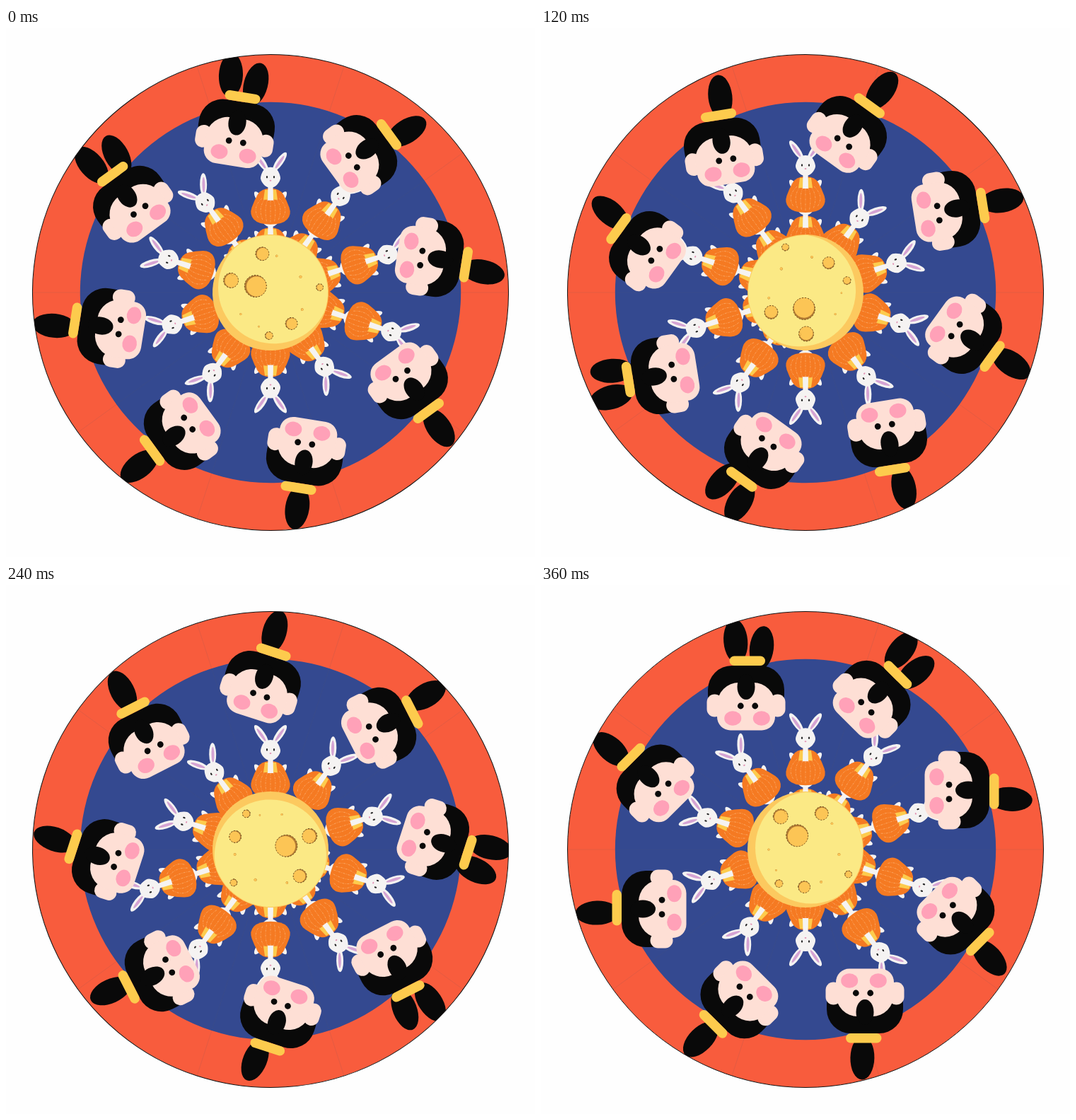
An HTML page with a canvas for the animation above (400 ms loop, 748 by 748 pixels).

```html
<!DOCTYPE html>
<html lang="en">
<head>
<meta charset="utf-8">
<title>Moon rabbits</title>
<style>
html, body { margin: 0; width: 100%; height: 100%; overflow: hidden; background: #fefefe; }
canvas { display: block; }
</style>
</head>
<body>
<canvas id="stage" width="748" height="748"></canvas>
<script>
const ctx = document.getElementById('stage').getContext('2d');
const CENTER = 374, DISC = 336.5, MOON = 82;
const STEPS = 10, STEP_MS = 40, SLOT = 360 / STEPS;
const HEADS = 8, RISE = 5.55, BUN_SHIFT = 4.6;
const BLACK = '#090909', SKIN = '#fedfd5', PINK = '#ffa1b8', GOLD = '#fdcb4d';
const WHITE = '#f5f3f2', ORANGE = '#f57a22', MAUVE = '#d5a3d3';
const SIDES = [-1, 1];
const rad = deg => deg * Math.PI / 180;

function ellipse(x, y, rx, ry, fill, tilt = 0) {
  ctx.beginPath();
  ctx.ellipse(x, y, rx, ry, rad(tilt), 0, 2 * Math.PI);
  ctx.fillStyle = fill;
  ctx.fill();
}

const circle = (x, y, r, fill) => ellipse(x, y, r, r, fill);

function roundRect(x, y, w, h, radii, fill) {
  ctx.beginPath();
  ctx.roundRect(x, y, w, h, radii);
  ctx.fillStyle = fill;
  ctx.fill();
}

function trapezoid(top, topHalf, bottom, bottomHalf, fill) {
  ctx.beginPath();
  ctx.moveTo(-topHalf, top);
  ctx.lineTo(topHalf, top);
  ctx.lineTo(bottomHalf, bottom);
  ctx.lineTo(-bottomHalf, bottom);
  ctx.fillStyle = fill;
  ctx.fill();
}

// Smooth symmetric shape from the control points of its right half.
function mirroredBlob(half, fill) {
  const points = [...half, ...half.map(([x, y]) => [-x, y]).reverse()];
  const mid = (a, b) => [(a[0] + b[0]) / 2, (a[1] + b[1]) / 2];
  ctx.beginPath();
  ctx.moveTo(...mid(points[points.length - 1], points[0]));
  points.forEach((p, i) => ctx.quadraticCurveTo(...p, ...mid(p, points[(i + 1) % points.length])));
  ctx.fillStyle = fill;
  ctx.fill();
}

function around(count, draw, offset = 0) {
  for (let i = 0; i < count; i++) {
    ctx.save();
    ctx.rotate(rad(360 * i / count + offset));
    draw(i);
    ctx.restore();
  }
}

function seededRandom(seed) {
  return () => (seed = seed * 16807 % 2147483647) / 2147483647;
}

function drawDisc() {
  circle(0, 0, DISC, '#f85c3d');
  circle(0, 0, DISC * 0.8, '#344990');
  ctx.strokeStyle = 'rgba(90, 85, 105, .2)';
  ctx.lineWidth = 0.6;
  around(STEPS, () => {
    ctx.beginPath();
    ctx.moveTo(0, 0);
    ctx.lineTo(0, -DISC);
    ctx.stroke();
  }, SLOT / 2);
}

function drawPumpkin() {
  mirroredBlob([[13, 15], [23, 32], [30, 52], [17, 66]], ORANGE);
  ctx.strokeStyle = '#fbb274';
  ctx.lineWidth = 0.7;
  ctx.setLineDash([3, 1.5, 1, 1.5]);
  for (let i = -3; i <= 3; i++) {
    ctx.beginPath();
    ctx.moveTo(i * 4, 32 - Math.abs(i));
    ctx.quadraticCurveTo(i * 9, 43, i * 5.5, 64 - Math.abs(i) * 2);
    ctx.stroke();
  }
  ctx.setLineDash([]);
  trapezoid(17, 8, 31, 10, GOLD);
  trapezoid(10, 3.5, 32, 4, WHITE);
}

function drawRabbit(radius) {
  ctx.save();
  ctx.translate(0, -radius);
  drawPumpkin();
  for (const side of SIDES) {
    ellipse(side * 13, -22.5, 5, 16, WHITE, side * 35);
    ellipse(side * 13, -22, 2, 11, MAUVE, side * 35);
  }
  mirroredBlob([[8, -15], [14, -3], [14, 4], [6, 14]], WHITE);
  for (const side of SIDES) ellipse(side * 5, -1, 1.1, 1.8, '#222');
  ellipse(0, 4, 1.4, 1, '#e295b5');
  ctx.restore();
}

// Each turn of the spiral continues the one inside it; outer rabbits hide inner ones.
function drawRabbits() {
  for (let turn = -2; turn <= 0; turn++) {
    around(STEPS, i => drawRabbit(129 + RISE * (i + STEPS * turn)));
  }
}

function drawBun(phase) {
  const x = 22 - BUN_SHIFT * phase;
  ellipse(x, -285 - 2.4 * Math.min(phase, 4), 17, 31, BLACK, x * 0.32);
}

function drawHead(index) {
  const phase = (index + HEADS / 2) % HEADS;
  ctx.save();
  ctx.translate(-84, 0);
  drawBun(phase);
  if (phase < 2) drawBun(phase + HEADS);
  roundRect(-54, -260, 108, 56, [34, 34, 14, 14], BLACK);
  for (const side of SIDES) roundRect(side * 44.5 - 11, -219.5, 22, 32, 11, SKIN);
  roundRect(-41, -236, 82, 67.5, [31, 31, 19, 19], SKIN);
  ellipse(0, -230, 12.5, 18, BLACK);
  for (const side of SIDES) {
    circle(2.5 + side * 10.2, -203, 4.4, BLACK);
    ellipse(1.5 + side * 20.3, -185.5, 12, 10.3, PINK);
  }
  roundRect(-23.5, -273.5, 50.5, 13.5, 6.7, GOLD);
  ctx.restore();
}

function drawCrater(angle, distance, size) {
  const x = distance * Math.cos(rad(angle)), y = distance * Math.sin(rad(angle));
  circle(x, y, size, '#b27b33');
  circle(x - size * 0.06, y - size * 0.08, size * 0.92, '#fcc555');
  if (size < 3) return;
  ctx.setLineDash([2, 2]);
  ctx.strokeStyle = '#65451c';
  ctx.beginPath();
  ctx.arc(x, y, size, 0, 2 * Math.PI);
  ctx.stroke();
  ctx.setLineDash([]);
}

function drawMoon() {
  circle(0, 0, MOON, '#fcc95f');
  ctx.save();
  ctx.beginPath();
  ctx.arc(0, 0, MOON - 1, 0, 2 * Math.PI);
  ctx.clip();
  circle(-8, 2.5, MOON - 3, '#fbe985');
  ctx.restore();
  ctx.lineWidth = 0.9;

  drawCrater(59, 23, 15.5);
  drawCrater(-88, 53, 8.5);
  drawCrater(-52, 61, 5.5);
  drawCrater(-150, 70, 5);
  drawCrater(53, 58.5, 10.5);
  drawCrater(114, 56, 9.5);

  const random = seededRandom(11);
  for (let i = 0; i < 6; i++) {
    drawCrater(60 * i + 30 * random(), 44 + 18 * random(), 1.2 + 1.2 * random());
  }
}

function drawScene(step) {
  ctx.fillStyle = '#fefefe';
  ctx.fillRect(0, 0, 2 * CENTER, 2 * CENTER);
  ctx.save();
  ctx.translate(CENTER, CENTER);
  ctx.rotate(rad(-SLOT * (step - 4)));
  ctx.save();
  ctx.beginPath();
  ctx.arc(0, 0, DISC, 0, 2 * Math.PI);
  ctx.clip();
  drawDisc();
  drawRabbits();
  around(HEADS, drawHead);
  drawMoon();
  ctx.restore();
  ctx.beginPath();
  ctx.arc(0, 0, DISC, 0, 2 * Math.PI);
  ctx.strokeStyle = '#111';
  ctx.lineWidth = 1;
  ctx.stroke();
  ctx.restore();
}

const start = performance.now();
function tick() {
  const elapsed = Math.max(0, performance.now() - start);
  drawScene(Math.floor(elapsed / STEP_MS) % STEPS);
  requestAnimationFrame(tick);
}
tick();
</script>
</body>
</html>
```
